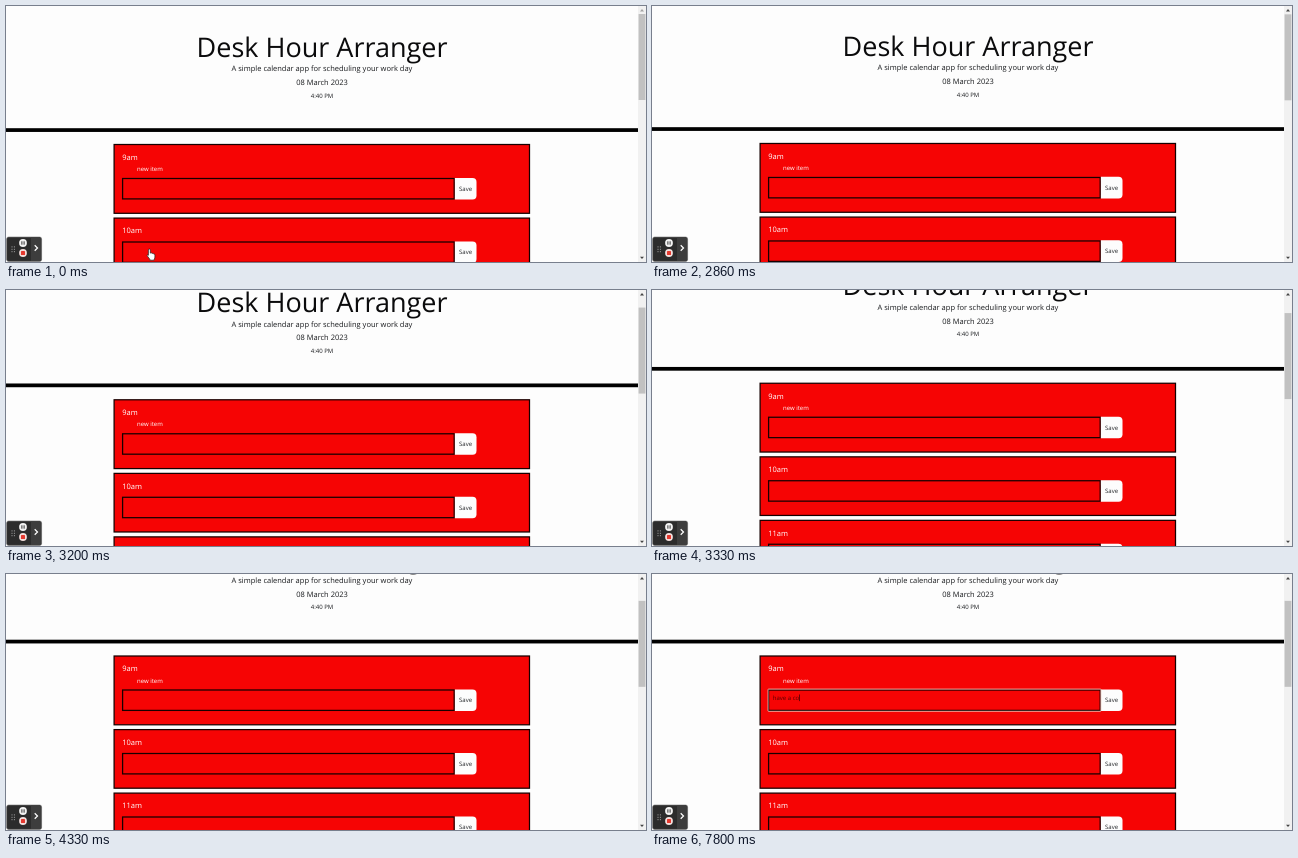
Animation, 640 px wide and 256 px high, one loop 8000 ms. Source, as an HTML page:

```html
<!DOCTYPE html>
<html lang="en">
<head>
<meta charset="utf-8">
<title>Day planner</title>
<style>
  html, body { margin: 0; width: 100%; height: 100%; overflow: hidden; background: #fdfdfd; }
  svg { display: block; width: 640px; height: 256px; }
  text { font-family: "Open Sans", "Noto Sans", sans-serif; font-size: 6px; text-rendering: geometricPrecision; }
  .head { fill: #191b1e; text-anchor: middle; }
  .title { font-size: 27px; fill: #0b0b0c; }
  .mid { font-size: 7.5px; }
  .light { fill: #fff; }
  .card { fill: #f60404; stroke: #160000; stroke-width: 1.25; }
  .save { fill: #fdfdfd; }
  .label { fill: #24272a; text-anchor: middle; }
  .typed { fill: #5a0000; }
</style>
</head>
<body>
<svg viewBox="0 0 640 256">
  <rect width="640" height="256" fill="#fdfdfd"/>
  <g id="page">
    <text class="head title" x="316" y="50.7">Desk Hour Arranger</text>
    <text class="head mid" x="316" y="65.4">A simple calendar app for scheduling your work day</text>
    <text class="head mid" x="316" y="79">08 March 2023</text>
    <text class="head" x="316" y="91.7">4:40 PM</text>
    <rect y="122.2" width="632" height="3.75"/>
    <g id="cards"></g>
    <text class="light" x="131" y="165.2">new item</text>
    <g id="focus">
      <rect x="116" y="171.6" width="333" height="22.2" rx=".6" fill="none" stroke="#ecd2c6" stroke-width=".8"/>
      <text id="typed" class="typed" x="120.8" y="182.4" xml:space="preserve"></text>
      <rect id="caret" y="177" width=".7" height="6.6" fill="#300"/>
    </g>
  </g>

  <g id="scrollbar">
    <rect x="632" width="8" height="256" fill="#f1f1f1"/>
    <rect id="thumb" x="632.6" y="8" width="6.8" height="86" fill="#c1c1c1"/>
    <path id="up" d="M634 5.4h4l-2-2.3z"/>
    <path d="M634 250.7h4l-2 2.3z" fill="#444"/>
  </g>

  <g id="recorder">
    <rect x=".6" y="231" width="35" height="24.4" rx="2" fill="#2c2c2c" stroke="#777" stroke-width=".6"/>
    <path d="M25 231.4h8.6q1.6 0 1.6 1.6v20.4q0 1.6-1.6 1.6h-8.6z" fill="#3d3d3d"/>
    <path d="M6 240.4v6M8.4 240.4v6" stroke="#aaa" stroke-dasharray="1 1.4"/>
    <circle cx="17" cy="237" r="3.9" fill="#f2f2f2"/>
    <path d="M15.9 235.3v3.4M18.1 235.3v3.4" stroke="#333"/>
    <circle cx="17" cy="247" r="3.9" fill="#f2dedc"/>
    <rect x="15" y="245" width="4" height="4" rx=".6" fill="#e5392f"/>
    <path d="M28.7 239.3l2.8 2.7-2.8 2.7" fill="none" stroke="#fff" stroke-width="1.2"/>
  </g>

  <path id="hand" fill="#fff" stroke="#222" stroke-width=".7" stroke-linejoin="round"
    d="M142.4 244q0-1.1.9-1.1t1 1.1v3.1q1.3-.6 1.8.3 1.2-.4 1.6.5 1.2-.1 1.2 1.2v2q0 1.2-.7 2v1.1h-4.4v-1l-2.5-3.3q-.5-1 .3-1.2l.8.6z"/>
</svg>
<script>
const LOOP = 8000, FPS = 15;
const $ = id => document.getElementById(id);

// Time and scroll offset pairs for the single wheel gesture
const scrollKeys = [[2790, 0], [2860, 1], [3060, 12], [3330, 45.5], [3530, 55], [3660, 56.5]];
const message = "have a co";
const keyTimes = [6130, 6330, 6460, 6530, 6800, 7000, 7130, 7600, 7800];
const focusAt = 4860;

function card(label, top, height, inputTop) {
  const y = top + inputTop;
  return `<rect class="card" x="108.1" y="${top + .6}" width="415.4" height="${height - 1.2}"/>
    <text class="light mid" x="116.2" y="${top + 15.9}">${label}</text>
    <rect class="card" x="116.6" y="${y + .6}" width="331.6" height="20.4"/>
    <path class="save" d="M448.9 ${y}h17.6q4 0 4 4v13.6q0 4-4 4h-17.6z"/>
    <text class="label" x="459.6" y="${y + 13}">Save</text>`;
}

$("cards").innerHTML = card("9am", 137.9, 70, 34) +
  card("10am", 211.5, 59.8, 23.9) + card("11am", 275, 59.8, 23.9);

// Smooth curve through the keys, flat at both ends
function scrollAt(t) {
  const k = scrollKeys, last = k.length - 1;
  if (t <= k[0][0]) return 0;
  if (t >= k[last][0]) return k[last][1];
  const i = k.findIndex(p => p[0] > t) - 1;
  const slope = n => n === 0 || n === last ? 0 :
    (k[n + 1][1] - k[n - 1][1]) / (k[n + 1][0] - k[n - 1][0]);
  const [t0, y0] = k[i], [t1, y1] = k[i + 1];
  const d = t1 - t0, u = (t - t0) / d, v = 1 - u;
  return v * v * (1 + 2 * u) * y0 + u * u * (3 - 2 * u) * y1 +
    d * u * v * (v * slope(i) - u * slope(i + 1));
}

function caretOn(t) {
  const since = t - Math.max(focusAt, ...keyTimes.filter(k => k <= t));
  return since % 1070 < 535;
}

function show(el, on) {
  el.style.display = on ? "" : "none";
}

function draw(now) {
  const t = Math.floor((now % LOOP + 7) * FPS / 1000) * 1000 / FPS;
  const y = scrollAt(t - 6);
  $("page").setAttribute("transform", `translate(0 ${-y})`);
  $("thumb").setAttribute("y", 8 + y / 3);
  $("up").setAttribute("fill", y ? "#444" : "#a3a3a3");

  const out = Math.max(0, t - 40) / 160;
  $("hand").setAttribute("transform", `translate(0 ${14 * out * out})`);
  show($("hand"), out < 1);

  show($("focus"), t >= focusAt);
  const text = message.slice(0, keyTimes.filter(k => k <= t).length);
  const typed = $("typed");
  if (typed.textContent !== text) typed.textContent = text;
  if (t >= focusAt) {
    $("caret").setAttribute("x", 120.9 + (text ? typed.getComputedTextLength() : 0));
    show($("caret"), caretOn(t));
  }
}

const start = performance.now();
function tick() {
  draw(performance.now() - start);
  requestAnimationFrame(tick);
}
tick();
</script>
</body>
</html>
```
